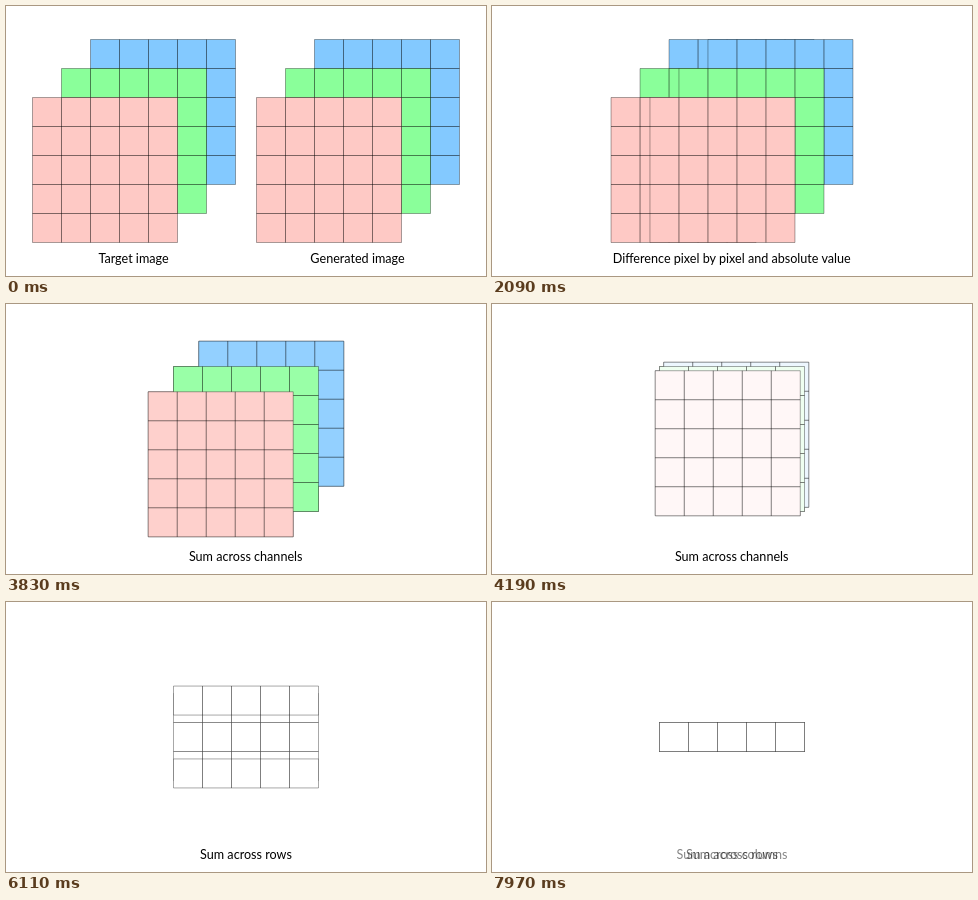
These frames come from a looping animation (480 by 270 pixels, 8000 ms). An HTML page:

```html
<!DOCTYPE html>
<html lang="en">
<head>
<meta charset="utf-8">
<title>Image difference</title>
<style>
  html, body { margin: 0; width: 100%; height: 100%; overflow: hidden; background: #fff; }
  svg { display: block; width: 480px; height: 270px; }
  text { font: 12.6px Lato, "Open Sans", sans-serif; text-anchor: middle; fill: #000; }
  path { fill: none; stroke: #000; stroke-width: 1; }
  .rim { stroke-opacity: .34; }
  .mesh { stroke-opacity: .5; }
</style>
</head>
<body>
<svg id="stage" viewBox="0 0 480 270"></svg>
<script>
const LOOP = 8000, STEP = 30, PHASE = 20, RUN = 1000;
const CELL = 29, N = 5, SIZE = CELL * N;

// Start times of each phase
const MERGE = 1437, FLATTEN = 3517, ROWS_A = 5505, ROWS_B = 6435;
const CAPTIONS = [360, 2520, 4485, 7480];

const COLORS = [[131, 201, 255], [138, 255, 154], [254, 201, 197]]; // back to front
const CENTER = { x: 167.5, y: 62.5 };

const stage = document.getElementById('stage');

function add(parent, tag, attrs = {}) {
  const el = document.createElementNS('http://www.w3.org/2000/svg', tag);
  for (const key in attrs) el.setAttribute(key, attrs[key]);
  parent.appendChild(el);
  return el;
}

function grid(parent, rows) {
  const g = add(parent, 'g');
  const h = rows * CELL;
  const fill = add(g, 'rect', { width: SIZE, height: h, fill: '#fff' });
  let mesh = '';
  for (let i = 1; i < N; i++) mesh += `M${i * CELL} 0v${h}`;
  for (let i = 1; i < rows; i++) mesh += `M0 ${i * CELL}h${SIZE}`;
  add(g, 'path', { class: 'mesh', d: mesh });
  add(g, 'path', { class: 'rim', d: `M0 0h${SIZE}v${h}h${-SIZE}z` });
  return { g, fill };
}

function place(el, x, y) {
  el.setAttribute('transform', `translate(${x.toFixed(3)} ${y.toFixed(3)})`);
}

const stackLayer = add(stage, 'g');
const rowLayer = add(stage, 'g');

// Two stacks of three channels; side is -1 (left) or 1 (right)
const sheets = [-1, 1].flatMap(side =>
  COLORS.map((color, i) => ({ side, color, depth: 1 - i, ...grid(stackLayer, N) })));

// Inner rows first, so that the outer ones cover them
const rows = [2, 1, 3, 0, 4].map(i => ({ offset: i - 2, ...grid(rowLayer, 1) }));

function caption(...parts) {
  const g = add(stage, 'g');
  for (const [x, words] of parts) add(g, 'text', { x, y: 257 }).textContent = words;
  return g;
}

const captions = [
  caption([127.5, 'Target image'], [351.5, 'Generated image']),
  caption([239.7, 'Difference pixel by pixel and absolute value']),
  caption([239.7, 'Sum across channels']),
  caption([240, 'Sum across rows']),
  caption([240, 'Sum across columns'])
];

const sigmoid = x => 1 / (1 + Math.exp(-x));
const TAIL = sigmoid(-5);

// Sigmoid easing, rescaled to run from 0 to 1
function progress(t, start) {
  const u = Math.min(1, Math.max(0, (t - start) / RUN));
  return (sigmoid(10 * u - 5) - TAIL) / (1 - 2 * TAIL);
}

function draw(t) {
  const apart = 112 * (1 - progress(t, MERGE));
  const flat = progress(t, FLATTEN);
  const spread = CELL * (1 - flat);
  for (const s of sheets) {
    place(s.g, CENTER.x + s.side * apart + s.depth * spread, CENTER.y - s.depth * spread);
    const rgb = s.color.map(c => Math.round(c + (255 - c) * flat));
    s.fill.setAttribute('fill', `rgb(${rgb})`);
  }

  const a = progress(t, ROWS_A), b = progress(t, ROWS_B);
  for (const r of rows) {
    const far = Math.abs(r.offset);
    const dist = far === 2 ? 2 - a - b : far * (1 - b);
    place(r.g, CENTER.x, CENTER.y + CELL * (2 + Math.sign(r.offset) * dist));
  }

  const summed = flat > 0.99;
  stackLayer.style.display = summed ? 'none' : '';
  rowLayer.style.display = summed ? '' : 'none';

  captions.forEach((el, i) => {
    const shown = i ? progress(t, CAPTIONS[i - 1]) : 1;
    const gone = i < CAPTIONS.length ? progress(t, CAPTIONS[i]) : 0;
    el.style.opacity = shown * (1 - gone);
  });
}

const origin = performance.now();
function tick() {
  const t = (performance.now() - origin) % LOOP;
  draw(Math.round((t - PHASE) / STEP) * STEP + PHASE);
  requestAnimationFrame(tick);
}
tick();
</script>
</body>
</html>
```
